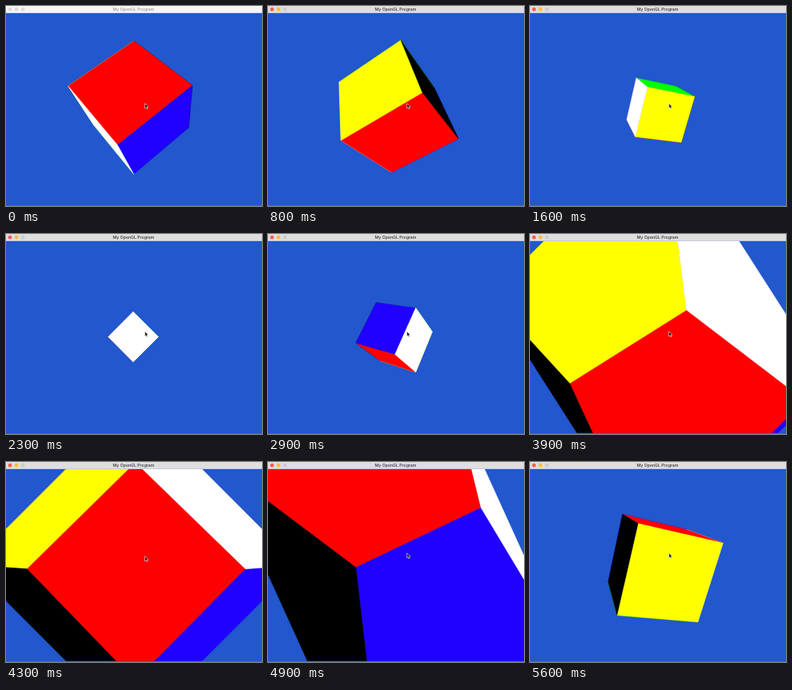
Write an HTML page that moves like this. It is 320 px wide and 250 px high and loops after 5700 ms.

```html
<!DOCTYPE html>
<html lang="en">
<head>
<meta charset="utf-8">
<title>Spinning cube</title>
<style>
  html, body { margin: 0; width: 100%; height: 100%; overflow: hidden; background: #2257cd; }
  svg { display: block; width: 320px; height: 250px; }
  text { font: 500 5.2px Inter, "Liberation Sans", sans-serif; text-anchor: middle; }
</style>
</head>
<body>
<svg viewBox="0 0 320 250">
  <defs><clipPath id="view"><rect y="8.8" width="320" height="240"/></clipPath></defs>
  <rect width="320" height="250" fill="#2257cd"/>
  <g id="cube" clip-path="url(#view)" stroke-width=".4" stroke-linejoin="round"></g>
  <rect y="249" width="320" height="1" fill="#4a679f"/>
  <rect id="bar" width="320" height="8.8"/>
  <g id="lights">
    <circle cx="5" cy="4.2" r="2.4"/>
    <circle cx="13.1" cy="4.2" r="2.4"/>
    <circle cx="21.2" cy="4.2" r="2.4"/>
  </g>
  <text id="title" x="159.5" y="6">My OpenGL Program</text>
  <path id="cursor" d="M0 0V6.4L1.5 5.1L2.5 7.3L3.6 6.8L2.7 4.7H4.5Z" fill="#111" stroke="#fff" stroke-width=".6"/>
</svg>
<script>
const LOOP = 5700, STEP = 100;
const CENTER = { x: 160, y: 128.8 };
const FOCAL = 120 / Math.tan(Math.PI / 8); // 45° field of view
const NEAR = 1;
const RAD = Math.PI / 180;

// [start time, camera distance]
const ZOOM = [[0, 3], [1100, 5], [1800, 7], [2500, 5], [3200, 3], [3900, 1], [5200, 3]];

// Faces: axis index, side and colour
const FACES = [
  [0, 1, '#ff0000'], [0, -1, '#00ff00'],
  [1, 1, '#ffff00'], [1, -1, '#2000ff'],
  [2, 1, '#ffffff'], [2, -1, '#000000']
];

const $ = id => document.getElementById(id);
const shapes = FACES.map(() =>
  $('cube').appendChild(document.createElementNS('http://www.w3.org/2000/svg', 'polygon')));

const mix = (a, ka, b, kb) => a.map((v, i) => v * ka + b[i] * kb);
const dot = (a, b) => a.reduce((sum, v, i) => sum + v * b[i], 0);

// Spin about the diagonal (1,1,0) plus a half-speed spin about the cube's own axis
function cubeAxes(t) {
  const phi = (0.09 * t - 29.7) * RAD, psi = phi / 2 - Math.PI;
  const h = Math.SQRT1_2, n = [h, h, 0], e = [-h, h, 0], z = [0, 0, 1];
  const k = mix(e, Math.sin(phi), z, -Math.cos(phi));
  return [
    mix(n, Math.sin(psi), k, Math.cos(psi)),
    mix(e, Math.cos(phi), z, Math.sin(phi)),
    mix(n, Math.cos(psi), k, -Math.sin(psi))
  ];
}

function clipNear(points) {
  const out = [];
  points.forEach((p, i) => {
    const q = points[(i + 1) % points.length];
    const a = -p[2] - NEAR, b = -q[2] - NEAR;
    if (a >= 0) out.push(p);
    if (a * b < 0) out.push(mix(p, b / (b - a), q, -a / (b - a)));
  });
  return out;
}

const project = ([x, y, z]) =>
  `${(CENTER.x - FOCAL * x / z).toFixed(2)},${(CENTER.y + FOCAL * y / z).toFixed(2)}`;

function drawCube(t) {
  const distance = ZOOM.filter(([start]) => t >= start).pop()[1];
  const axes = cubeAxes(t), middle = [0, 0, -distance];
  const faces = FACES.map(([axis, side, color]) => {
    const normal = axes[axis].map(v => v * side);
    const u = axes[(axis + 1) % 3], v = axes[(axis + 2) % 3];
    const face = mix(middle, 1, normal, 0.5);
    const corners = [[1, 1], [-1, 1], [-1, -1], [1, -1]]
      .map(([a, b]) => mix(face, 1, mix(u, a, v, b), 0.5));
    return { color, corners, facing: dot(normal, face) < 0 };
  });
  // Inner sides first, outer sides on top
  faces.sort((a, b) => a.facing - b.facing);
  faces.forEach(({ color, corners }, i) => {
    shapes[i].setAttribute('points', clipNear(corners).map(project).join(' '));
    shapes[i].setAttribute('fill', color);
    shapes[i].setAttribute('stroke', color);
  });
}

function drawWindow(t) {
  const active = t >= 300;
  const colors = active ? ['#fc5b57', '#fdbc40', '#cdcdcd'] : ['#dcdcdc', '#dcdcdc', '#dcdcdc'];
  [...$('lights').children].forEach((light, i) => light.setAttribute('fill', colors[i]));
  $('bar').setAttribute('fill', active ? '#dfdedf' : '#f6f6f6');
  $('title').setAttribute('fill', active ? '#333' : '#9a9a9a');
  const lift = 8 * Math.min(1, Math.max(0, (t - 3900) / 800));
  $('cursor').setAttribute('transform', `translate(173.6 ${121.8 - lift}) scale(.95)`);
}

function render(now) {
  const t = Math.floor((now % LOOP) / STEP) * STEP;
  drawCube(t);
  drawWindow(t);
}

const begin = performance.now();
function tick() {
  render(Math.max(0, performance.now() - begin));
  requestAnimationFrame(tick);
}
tick();
</script>
</body>
</html>
```
